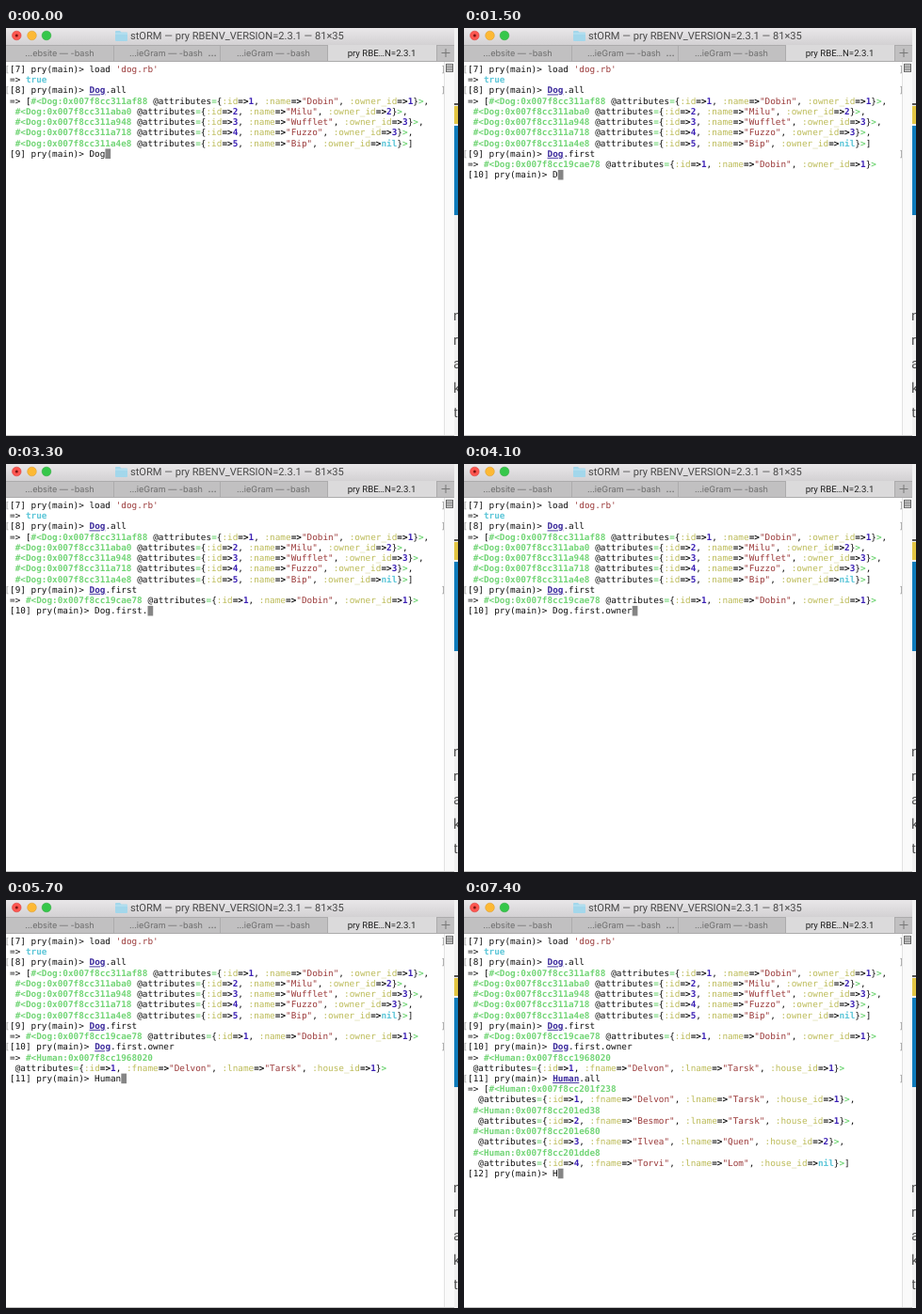
These frames come from a looping animation (480x434 px, 7500 ms). An HTML page:

```html
<!DOCTYPE html>
<html lang="en">
<head>
<meta charset="utf-8">
<title>Terminal session</title>
<style>
  html, body { margin: 0; width: 100%; height: 100%; overflow: hidden; background: #fff; }
  svg { display: block; width: 480px; height: 434px; }
  text { white-space: pre; text-rendering: geometricPrecision; }
  .title { font: 11.1px Roboto, sans-serif; fill: #484848; }
  .tab { font: 9.1px Inter, sans-serif; fill: #6c6c6c; text-anchor: middle; }
  .tab .active { font: 9.6px Roboto, sans-serif; fill: #222; }
  .page { font: 15px Roboto, sans-serif; fill: #555; }
  #screen { font: 9.36px "DejaVu Sans Mono", "Liberation Mono", monospace; fill: #111; }
  .obj { fill: #72d576; font-weight: bold; }
  .str { fill: #9b3a3a; }
  .key { fill: #bcbb58; }
  .arrow { font-weight: bold; }
  .num { fill: #3b20b4; font-weight: bold; }
  .lit { fill: #5cc6d8; font-weight: bold; }
  .cls { fill: #3b2a9c; font-weight: bold; text-decoration: underline; }
  .mark { fill: #a2a2a2; }
</style>
</head>
<body>
<svg viewBox="0 0 480 434">
  <defs>
    <linearGradient id="bar" x2="0" y2="1">
      <stop stop-color="#e9e7e9"/><stop offset="1" stop-color="#d3d1d3"/>
    </linearGradient>
  </defs>

  <!-- page behind the window -->
  <rect width="480" height="434" fill="#f1f1f1"/>
  <rect x="476" y="80" width="4" height="2" fill="#555"/>
  <rect x="476" y="83" width="4" height="19" fill="#e3c644"/>
  <rect x="476" y="104" width="4" height="95" fill="#0f7cbc"/>
  <g class="page">
    <text x="475" y="311">n</text>
    <text x="475" y="337">r</text>
    <text x="475" y="362">a</text>
    <text x="475" y="388">k</text>
    <text x="475" y="414">t</text>
  </g>

  <!-- window -->
  <rect y="36" width="476" height="398" fill="#fff"/>
  <rect width="476" height="18" fill="url(#bar)"/>
  <g stroke-width=".6">
    <circle cx="11.300" cy="8" r="4.800" fill="#fc5650" stroke="#dc4640"/>
    <circle cx="27.500" cy="8" r="4.800" fill="#fdb934" stroke="#dea034"/>
    <circle cx="43" cy="8" r="4.800" fill="#35c74a" stroke="#2cab3c"/>
  </g>
  <circle cx="11.300" cy="8" r="1.500" fill="#7c1512"/>
  <path d="M116 4q0-1 1-1h4l1.500 1.500h5.500q1 0 1 1v7.500q0 1-1 1h-11q-1 0-1-1z" fill="#a3d7eb"/>
  <path d="M116 6h13" stroke="#bfe5f3"/>
  <text class="title" x="132" y="12.300">stORM — pry RBENV_VERSION=2.3.1 — 81×35</text>

  <rect y="18" width="476" height="18" fill="#c1c0c1"/>
  <rect x="341" y="18" width="116" height="18" fill="#dbdadb"/>
  <path d="M0 18.500H341M457 18.500H476M0 35.500H476M114.500 18V36M227.500 18V36M341.500 18V36M457.500 18V36" stroke="#acabac"/>
  <g class="tab">
    <text x="57" y="30">…ebsite — -bash</text>
    <text x="170" y="30">…ieGram — -bash</text>
    <text x="219" y="30" font-weight="bold">…</text>
    <text x="284" y="30">…ieGram — -bash</text>
    <text x="399" y="30" class="active">pry RBE…N=2.3.1</text>
  </g>
  <path d="M462.500 26.500h9M467 22v9" stroke="#777"/>

  <!-- scroll gutter -->
  <rect x="466" y="36" width="10" height="398" fill="#fafafa"/>
  <path d="M465.500 36V434" stroke="#e2e2e2"/>
  <rect x="467.500" y="38.500" width="7" height="8" fill="#eee" stroke="#666"/>
  <path d="M468 40.500h6M468 42.500h6M468 44.500h6" stroke="#666"/>

  <rect id="cursor" width="5.700" height="10.600" fill="#858585"/>
  <g id="screen"></g>
  <path d="M0 433.500H476" stroke="#c4c4c4"/>
</svg>

<script>
const LOOP = 7500, LEFT = 4, TOP = 47, CELL = 5.635, LINE = 11.23;
const screen = document.getElementById('screen');
const cursor = document.getElementById('cursor');

const dog = (addr, id, name, owner) =>
  `#<Dog:0x007f8cc${addr} @attributes={:id=>${id}, :name=>"${name}", :owner_id=>${owner}}>`;
const human = addr => `#<Human:0x007f8cc${addr}`;
const traits = (id, first, last, house) =>
  `@attributes={:id=>${id}, :fname=>"${first}", :lname=>"${last}", :house_id=>${house}}>`;

// keys: [time, characters typed], linear in between
const sessions = [
  { cmd: "load 'dog.rb'", enter: -1, out: ['=> true'] },
  { cmd: 'Dog.all', enter: -1, out: [
    `=> [${dog('311af88', 1, 'Dobin', 1)},`,
    ` ${dog('311aba0', 2, 'Milu', 2)},`,
    ` ${dog('311a948', 3, 'Wufflet', 3)},`,
    ` ${dog('311a718', 4, 'Fuzzo', 3)},`,
    ` ${dog('311a4e8', 5, 'Bip', 'nil')}]`] },
  { cmd: 'Dog.first', keys: [[0, 3], [800, 9]], enter: 1100,
    out: [`=> ${dog('19cae78', 1, 'Dobin', 1)}`] },
  { cmd: 'Dog.first.owner', keys: [[1500, 1], [2500, 6], [4000, 15]], enter: 4400, out: [
    `=> ${human('1968020')}`,
    ` ${traits(1, 'Delvon', 'Tarsk', 1)}`] },
  { cmd: 'Human.all', keys: [[4900, 1], [6200, 9]], enter: 6700, out: [
    `=> [${human('201f238')}`,
    `  ${traits(1, 'Delvon', 'Tarsk', 1)},`,
    ` ${human('201ed38')}`,
    `  ${traits(2, 'Besmor', 'Tarsk', 1)},`,
    ` ${human('201e680')}`,
    `  ${traits(3, 'Ilvea', 'Quen', 2)},`,
    ` ${human('201dde8')}`,
    `  ${traits(4, 'Torvi', 'Lom', 'nil')}]`] },
  { cmd: 'H', keys: [[7300, 1]], enter: Infinity, out: [] }
];

const TOKENS = new RegExp([
  '(?<obj>#<\\w+:\\w+|=(?=\\{)|(?<=\\})>)',
  `(?<str>"[^"]*"|'[^']*')`,
  '(?<key>:\\w+(?==>))',
  '(?<arrow>(?<=\\w)=>)',
  '(?<num>(?<==>)\\d+)',
  '(?<lit>\\b(?:nil|true)\\b)',
  '(?<cls>(?<=> )(?:Dog|Human)\\b)'
].join('|'), 'g');

const escapeText = s => s.replace(/&/g, '&amp;').replace(/</g, '&lt;');
const span = (text, col, type = '') =>
  `<tspan x="${LEFT + col * CELL}" class="${type}">${escapeText(text)}</tspan>`;

function highlight(line) {
  let html = '', end = 0;
  for (const m of line.matchAll(TOKENS)) {
    const type = Object.keys(m.groups).find(k => m.groups[k]);
    if (m.index > end) html += span(line.slice(end, m.index), end);
    html += span(m[0], m.index, type);
    end = m.index + m[0].length;
  }
  return end < line.length ? html + span(line.slice(end), end) : html;
}

function typedCount(keys, t) {
  if (t < keys[0][0]) return 0;
  for (let i = 1; i < keys.length; i++) {
    const [t0, n0] = keys[i - 1], [t1, n1] = keys[i];
    if (t < t1) return Math.floor(n0 + (n1 - n0) * (t - t0) / (t1 - t0));
  }
  return keys[keys.length - 1][1];
}

let shown = '';
function render(t) {
  const rows = [];
  let input = '';
  for (const [i, { cmd, keys, enter, out }] of sessions.entries()) {
    const prompt = `[${i + 7}] pry(main)> `;
    if (t < enter) {
      input = prompt + cmd.slice(0, typedCount(keys, t));
      rows.push(span(input, 0));
      break;
    }
    rows.push(span('[', -1, 'mark') + highlight(prompt + cmd) + span(']', 81.2, 'mark'),
      ...out.map(highlight));
  }
  if (input === shown) return;
  shown = input;
  screen.innerHTML = rows.map((row, i) => `<text y="${TOP + i * LINE}">${row}</text>`).join('');
  cursor.setAttribute('x', LEFT + input.length * CELL);
  cursor.setAttribute('y', TOP + (rows.length - 1) * LINE - 8.4);
}

const start = performance.now();
function tick() {
  render((performance.now() - start) % LOOP);
  requestAnimationFrame(tick);
}
tick();
</script>
</body>
</html>
```
